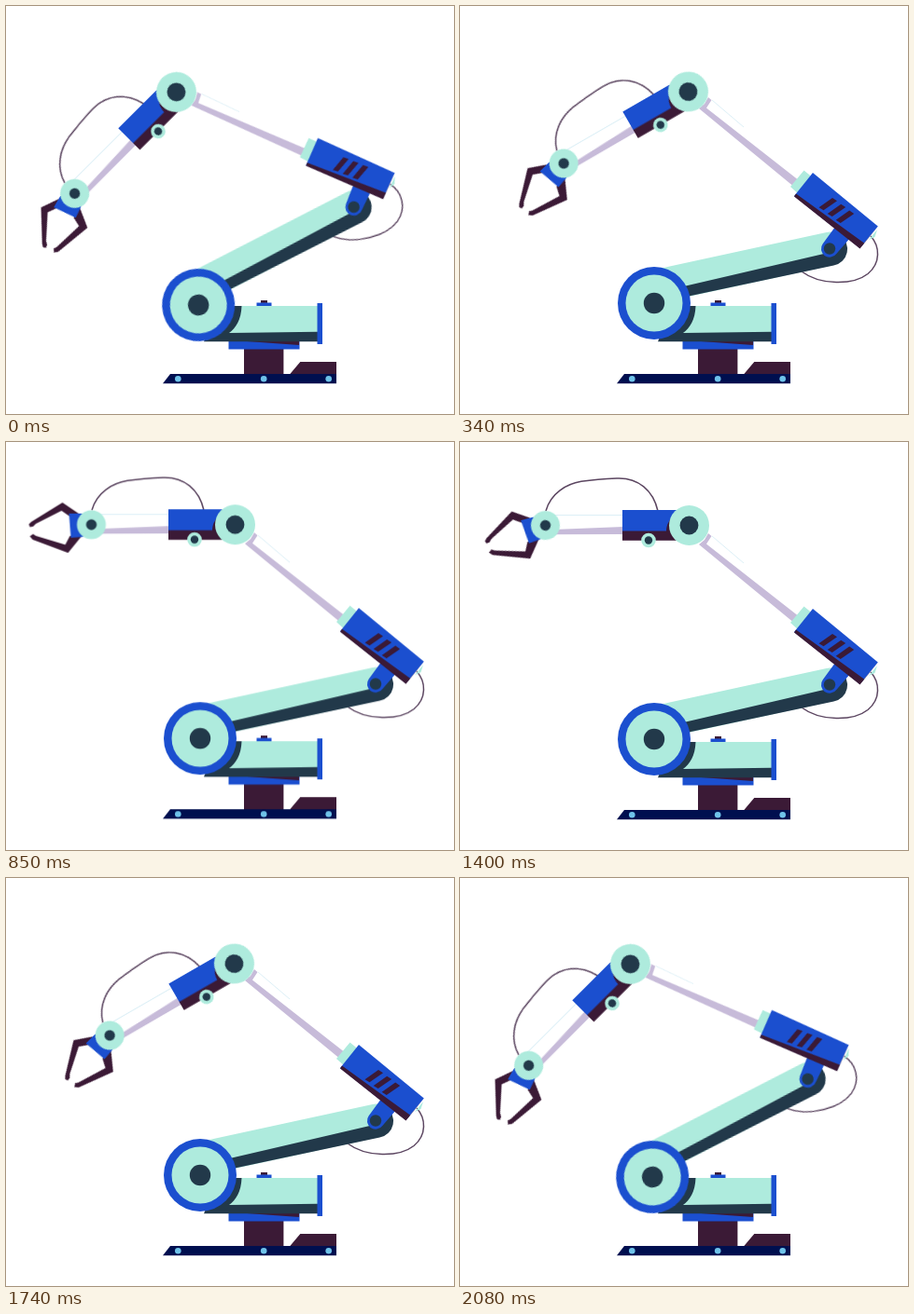
Write an HTML page that moves like this. It is 480 px wide and 438 px high and loops after 2.25 s.

```html
<!DOCTYPE html>
<html lang="en">
<head>
<meta charset="utf-8">
<title>Robot arm</title>
<style>
  html, body { margin: 0; width: 100%; height: 100%; overflow: hidden; background: #fff; }
  svg { display: block; width: 100vw; height: 100vh; }

  .mint { fill: #aeebdd; }
  .blue { fill: #1b4fcf; }
  .slate { fill: #22394a; }
  .plum { fill: #3b1a36; }
  .navy { fill: #000f4f; }
  .lilac { fill: #c7bbd9; }
  .dot { fill: #6fc3ea; }
  .wire { fill: none; stroke: #5b4560; stroke-width: 1.5; }
  .glint { fill: none; stroke: #d8eef5; stroke-width: .9; }

  /* Poses are held and switched without tweening. */
  #base, #arm, #upper, #claw { animation: 2250ms step-end infinite; }
  #base { animation-name: base; }
  #arm { animation-name: arm; }
  #upper { animation-name: upper; }
  #claw { animation-name: claw; }

  @keyframes base {
    0%, 62.222%, 100% { transform: translate(0, 0); }
    37.777% { transform: translate(0, -.8px); }
  }
  @keyframes arm {
    0%, 92.444%, 100% { transform: translate(206.2px, 321px) rotate(-15deg); }
    7.555%, 84.888% { transform: translate(207.3px, 319.8px) rotate(-6deg); }
    15.111%, 22.666%, 30.222%, 62.222%, 69.777%, 77.333% { transform: translate(208px, 319px) rotate(0deg); }
    37.777% { transform: translate(208px, 318.2px) rotate(0deg); }
  }
  @keyframes upper {
    0%, 92.444%, 100% { transform: translate(182.5px, 92.4px) rotate(-45deg); }
    7.555%, 84.888% { transform: translate(219.9px, 90.2px) rotate(-35deg); }
    15.111%, 77.333% { transform: translate(244.5px, 92px) rotate(-30deg); }
    22.666%, 69.777% { transform: translate(245px, 90.7px) rotate(-20deg); }
    30.222%, 62.222% { transform: translate(245.5px, 89.5px) rotate(0deg); }
    37.777% { transform: translate(245.5px, 88.7px) rotate(0deg); }
  }
  @keyframes claw {
    0%, 62.222%, 100% { transform: translate(91.5px, 89.5px) rotate(-15deg); }
    37.777% { transform: translate(91.5px, 89.5px) rotate(0deg); }
  }
</style>
</head>
<body>
<svg viewBox="0 0 480 438">
  <g id="base">
    <path class="plum" d="M255 366H297.4V396H255ZM315.3 382H354V396H303.5Z"/>
    <path class="navy" d="M176 395H354V405.3H168Z"/>
    <g class="dot">
      <circle cx="184.3" cy="400.3" r="3.3"/>
      <circle cx="276.2" cy="400.3" r="3.3"/>
      <circle cx="345.7" cy="400.3" r="3.3"/>
    </g>
    <path class="blue" d="M238.5 359H314.5V368.5H238.5Z"/>
    <path class="plum" d="M258 360H314V364Z"/>
    <path class="plum" d="M273 316H280V319H273Z"/>
    <path class="blue" d="M268.5 318.5H284.5V322.5H268.5Z"/>
    <path class="mint" d="M230 322H334V351H230Z"/>
    <path class="slate" d="M228 322H252.5C252 337 246 346 239 351L334 349.7V360.2H212Z"/>
    <path class="blue" d="M333.5 319H339V363H333.5Z"/>
  </g>

  <g id="arm">
    <g transform="translate(-208 -319)">
      <path class="wire" d="M440 247C450 258 451 276 437 287.5C421 300 386 300 366 285"/>
    </g>
    <g transform="rotate(-12.3)">
      <path class="mint" d="M0 -35H196.6A18 18 0 0 1 196.6 1H0Z"/>
      <path class="slate" d="M15 -10.5L190 -13L210.4 -28.6A18 18 0 0 1 196.6 1.5L15 .5Z"/>
    </g>
    <circle class="blue" r="39"/>
    <circle class="mint" r="30.5"/>
    <circle class="slate" r="11.2"/>
    <g transform="translate(-208 -319)">
      <path class="glint" d="M270 101L304 130"/>
      <path class="lilac" d="M266 98L269.5 101L264 109.5L361.5 186L356 192.5L256 110L262 105Z"/>
      <path class="mint" d="M368.5 176.5L379 185L364 203L354 194ZM447 240L444.5 248L438 251Z"/>
      <path class="blue" d="M402 237L418 249L403.3 266A9 9 0 1 1 388.7 255.2Z"/>
      <circle class="slate" cx="396" cy="260.5" r="6.2"/>
      <path class="blue" d="M378 179L447.8 236.5L428.5 260L358 204Z"/>
      <path class="plum" d="M358 204.5L360 201.5L433 254.5L447.5 237L428.5 260.5Z"/>
      <g class="plum">
        <path id="slit" d="M399 206L404 209.3L389.5 219.3L384.5 216.2Z"/>
        <use href="#slit" x="9.2" y="6.7"/>
        <use href="#slit" x="18.2" y="13.6"/>
      </g>
    </g>
  </g>

  <g id="upper">
    <g transform="translate(-245.5 -89.5)">
      <path class="wire" d="M92 74C97 55 114 45 130 42.3C145 40.3 158 39.5 168 39C191 38 207 52 212 74"/>
      <path class="glint" d="M100 78.5H174"/>
      <path class="lilac" d="M100 94L175 91V99L100 99.3Z"/>
      <path class="plum" d="M174 94H240V105.8H174Z"/>
      <path class="blue" d="M174 73H240V95.5H174Z"/>
      <path class="plum" d="M221 96C221 89 224 83 230 79V98H221Z"/>
      <circle class="mint" cx="202" cy="105.5" r="7.8"/>
      <circle class="slate" cx="202" cy="105.5" r="4.2"/>
      <circle class="mint" cx="245.5" cy="89.5" r="21.5"/>
      <circle class="slate" cx="245.5" cy="89.5" r="9.9"/>
      <g id="claw">
        <path class="plum" d="M-13 -11.5L-31 -23.7L-64.5 -3L-67 -.5L-66 2.5L-62.5 2L-59.5 -1L-32 -15L-22 -8Z"/>
        <path class="plum" d="M-11 13L-25 30.3L-63 16L-66 12.5L-62.5 10L-59.5 12L-28 21.5L-23 12Z"/>
        <path class="blue" d="M-24 -12L-10 -12L-8 13L-22 14Z"/>
        <circle class="mint" r="15.5"/>
        <circle class="slate" r="5.7"/>
      </g>
    </g>
  </g>
</svg>
</body>
</html>
```
